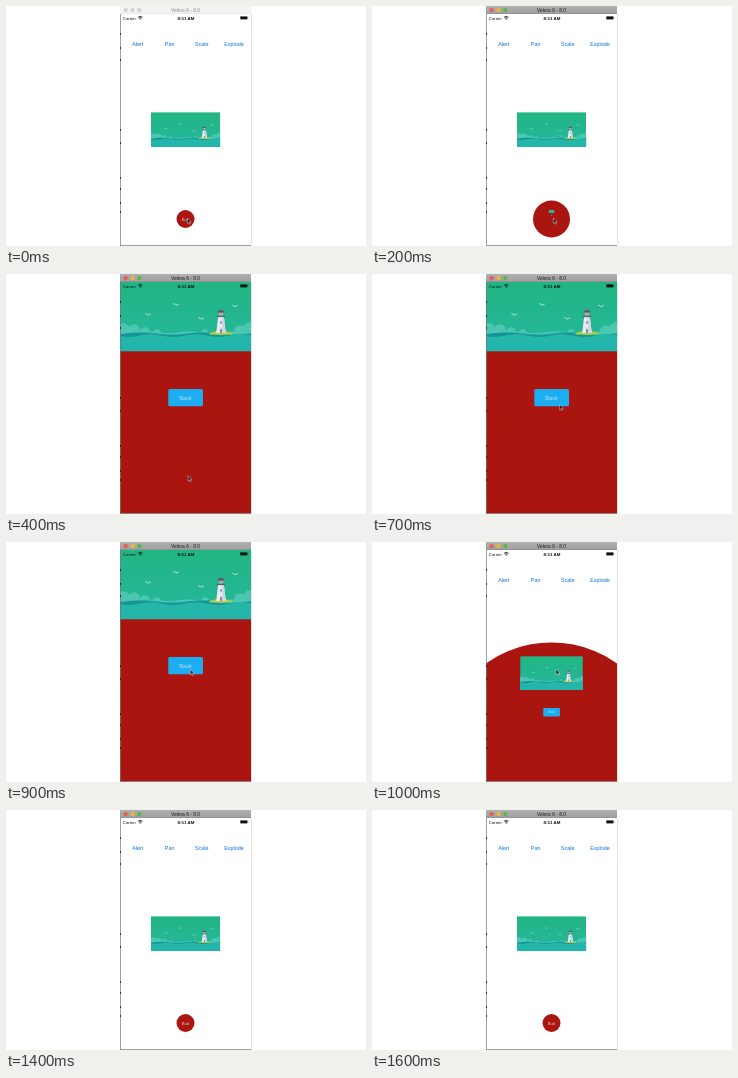
Animation, 360 px wide and 240 px high, one loop 1.8 s. Source, as an HTML page with a canvas:

```html
<!DOCTYPE html>
<html lang="en">
<head>
<meta charset="utf-8">
<title>Bubble transition</title>
<style>
  html, body { margin: 0; width: 100%; height: 100%; overflow: hidden; background: #fff; }
  canvas { display: block; width: 360px; height: 240px; }
</style>
</head>
<body>
<canvas id="stage"></canvas>
<script>
const canvas = document.getElementById('stage');
const ctx = canvas.getContext('2d');
const ratio = window.devicePixelRatio || 1;
canvas.width = 360 * ratio;
canvas.height = 240 * ratio;

const LOOP = 1800, STEP = 100;
const LEFT = 114, RIGHT = 245, TOP = 8, BOTTOM = 239.5;
const BUBBLE = { x: 179.5, y: 213, r: 9 };
const RED = '#ab1510', BLUE = '#0a70e8';
const SANS = '"Liberation Sans", Arial, sans-serif';

const lerp = (a, b, u) => a + (b - a) * u;
function ease(t, start, end) {
  const u = Math.min(1, Math.max(0, (t - start) / (end - start)));
  return u * u * (3 - 2 * u);
}

function rect(x, y, w, h, fill) {
  ctx.fillStyle = fill;
  ctx.fillRect(x, y, w, h);
}
function disc(x, y, r, fill) {
  ctx.fillStyle = fill;
  ctx.beginPath();
  ctx.arc(x, y, r, 0, Math.PI * 2);
  ctx.fill();
}
function poly(points, fill) {
  ctx.fillStyle = fill;
  ctx.beginPath();
  points.forEach(([x, y]) => ctx.lineTo(x, y));
  ctx.closePath();
  ctx.fill();
}
function text(str, x, y, size, fill, align = 'center', weight = 'normal') {
  ctx.font = `${weight} ${size}px ${SANS}`;
  ctx.textAlign = align;
  ctx.textBaseline = 'alphabetic';
  ctx.fillStyle = fill;
  ctx.fillText(str, x, y);
}
function vertical(y0, y1, from, to) {
  const g = ctx.createLinearGradient(0, y0, 0, y1);
  g.addColorStop(0, from);
  g.addColorStop(1, to);
  return g;
}

// Fills from a wavy line down to the bottom of the scene.
function wave(y, height, length, phase, fill) {
  ctx.fillStyle = fill;
  ctx.beginPath();
  ctx.moveTo(0, 71);
  for (let x = 0; x <= 131; x++) {
    ctx.lineTo(x, y + height * Math.sin(x / length * Math.PI * 2 + phase));
  }
  ctx.lineTo(131, 71);
  ctx.fill();
}

function bird(x, y) {
  ctx.beginPath();
  ctx.moveTo(x - 2.6, y - 1.2);
  ctx.quadraticCurveTo(x - 1, y - 1, x, y + .6);
  ctx.quadraticCurveTo(x + 1, y - .7, x + 2.7, y - .6);
  ctx.stroke();
}

function lighthouse(x, y) {
  ctx.save();
  ctx.translate(x, y);
  ctx.fillStyle = '#a9d046';
  ctx.beginPath();
  ctx.ellipse(0, 0, 12, 2.8, 0, Math.PI, 0);
  ctx.ellipse(0, 0, 12, 1, 0, 0, Math.PI);
  ctx.fill();
  poly([[-2.9, -17], [2.9, -17], [4.8, -1], [-4.8, -1]], '#e9ebf4');
  poly([[.8, -17], [2.9, -17], [4.8, -1], [1.4, -1]], '#cfd4e6');
  rect(-4, -18.3, 8, 1.5, '#5c5b77');
  rect(-2.3, -21.5, 4.6, 3.2, '#b9a98f');
  poly([[-3.8, -21.3], [-2.4, -23.2], [0, -24.3], [2.4, -23.2], [3.8, -21.3]], '#5d5670');
  rect(-.7, -12.5, 1.4, 2.2, '#6b6c88');
  rect(-.9, -5, 1.8, 4, '#7a7b95');
  ctx.restore();
}

// Seaside picture in a 131 by 71 box.
function scene(x, y, w, h) {
  ctx.save();
  ctx.translate(x, y);
  ctx.scale(w / 131, h / 71);
  ctx.beginPath();
  ctx.rect(0, 0, 131, 71);
  ctx.clip();
  rect(0, 0, 131, 71, vertical(0, 56, '#22b582', '#24b798'));

  const cloud = '#4bc6b1';
  [[3, 50, 7], [14, 50, 6], [25, 52, 5], [37, 53, 4], [85, 53, 4], [120, 51, 6], [130, 49, 7]]
    .forEach(([cx, cy, r]) => disc(cx, cy, r, cloud));
  wave(52, .8, 44, 1, cloud);
  wave(53.2, 1.1, 62, 2.6, '#15959a');
  wave(55.3, 1.3, 45, .4, '#24b6a9');
  wave(62, .9, 58, 2, '#21b5ac');

  ctx.strokeStyle = '#d9f4df';
  ctx.lineWidth = .8;
  [[28, 34.5], [56, 24.5], [81, 38.5], [115, 26]].forEach(([bx, by]) => bird(bx, by));
  lighthouse(101, 53.6);
  ctx.restore();
}

function home() {
  rect(LEFT, TOP, RIGHT - LEFT, BOTTOM - TOP, '#fff');
  [['Alert', 131.8], ['Pan', 163.6], ['Scale', 195.8], ['Explode', 227.9]]
    .forEach(([label, x]) => text(label, x, 39.6, 5.4, BLUE));
  scene(145, 106.2, 69.2, 34.8);
  disc(BUBBLE.x, BUBBLE.y, BUBBLE.r, RED);
  text('Bub', BUBBLE.x, 214.7, 4.3, '#edc8c5');
}

// The red screen grows out of the bubble's centre together with its contents.
function detail(scale) {
  if (scale <= 0) return;
  disc(BUBBLE.x, BUBBLE.y, BUBBLE.r + 216.5 * scale, RED);
  ctx.save();
  ctx.translate(BUBBLE.x, BUBBLE.y);
  ctx.scale(scale, scale);
  ctx.translate(-BUBBLE.x, -BUBBLE.y);
  scene(114, 6.3, 131, 71);
  ctx.fillStyle = '#1dadf1';
  ctx.beginPath();
  ctx.roundRect(162.3, 115, 34.7, 17.3, 1.5);
  ctx.fill();
  text('Back', 179.6, 125.8, 5.7, '#b8e4fb');
  ctx.restore();
}

function titleBar(active) {
  rect(114, 0, 131, 8, active ? vertical(0, 8, '#b0b0b0', '#9e9e9e') : '#f3f3f3');
  rect(114, 7.6, 131, .4, active ? '#858585' : '#d5d5d5');
  const lights = active ? ['#f0584f', '#f2b632', '#4fbd43'] : ['#d0d0d0', '#d0d0d0', '#d0d0d0'];
  lights.forEach((color, i) => disc(119.7 + i * 6.8, 4.1, 2.1, color));
  text('Velora 6 - 8.0', 179.5, 5.9, 4.9, active ? '#1c1c1c' : '#8a8a8a');
}

function statusBar() {
  text('Carrier', 116.8, 13.5, 4.3, '#111', 'left');
  text('8:51 AM', 180, 13.5, 4.4, '#111', 'center', 'bold');
  ctx.strokeStyle = '#111';
  ctx.lineWidth = .8;
  [1.8, 3.1].forEach(r => {
    ctx.beginPath();
    ctx.arc(134.3, 13.5, r, -Math.PI * .77, -Math.PI * .23);
    ctx.stroke();
  });
  disc(134.3, 13.1, .6, '#111');
  rect(234.3, 10.4, 7, 3, '#111');
  rect(241.5, 11.3, .7, 1.2, '#111');
}

function windowEdge() {
  rect(114, 8, .7, 232, '#777');
  rect(245, 8, .4, 232, '#bbb');
  rect(114, 239.3, 131, .7, '#777');
  [27, 41, 53, 123, 136, 171, 182, 196, 205].forEach(y => rect(114, y, .9, 2, '#222'));
}

function cursor(t) {
  if (t >= 1300) return;
  const up = ease(t, 320, 680), drift = ease(t, 720, 940);
  const x = lerp(lerp(181.4, 187.7, up), 184, drift);
  const y = lerp(lerp(212, 130.4, up), 127.2, drift);
  const outline = [[0, 0], [0, 5.4], [1.2, 4.3], [2, 6.2], [2.9, 5.8], [2.1, 4], [3.8, 4]];
  ctx.save();
  ctx.translate(x, y);
  poly(outline, '#111');
  ctx.strokeStyle = '#eee';
  ctx.lineWidth = .45;
  ctx.stroke();
  ctx.restore();
}

function draw(now) {
  const t = Math.min(1600, Math.floor(now % LOOP / STEP) * STEP);
  const scale = ease(t, 178, 352) - ease(t, 911, 1084);

  ctx.setTransform(ratio, 0, 0, ratio, 0, 0);
  rect(0, 0, 360, 240, '#fff');
  ctx.save();
  ctx.beginPath();
  ctx.rect(LEFT, TOP, RIGHT - LEFT, BOTTOM - TOP);
  ctx.clip();
  home();
  detail(scale);
  ctx.restore();
  titleBar(t >= 100);
  statusBar();
  windowEdge();
  cursor(t);
}

const start = performance.now();
function tick() {
  draw(performance.now() - start);
  requestAnimationFrame(tick);
}
tick();
</script>
</body>
</html>
```
